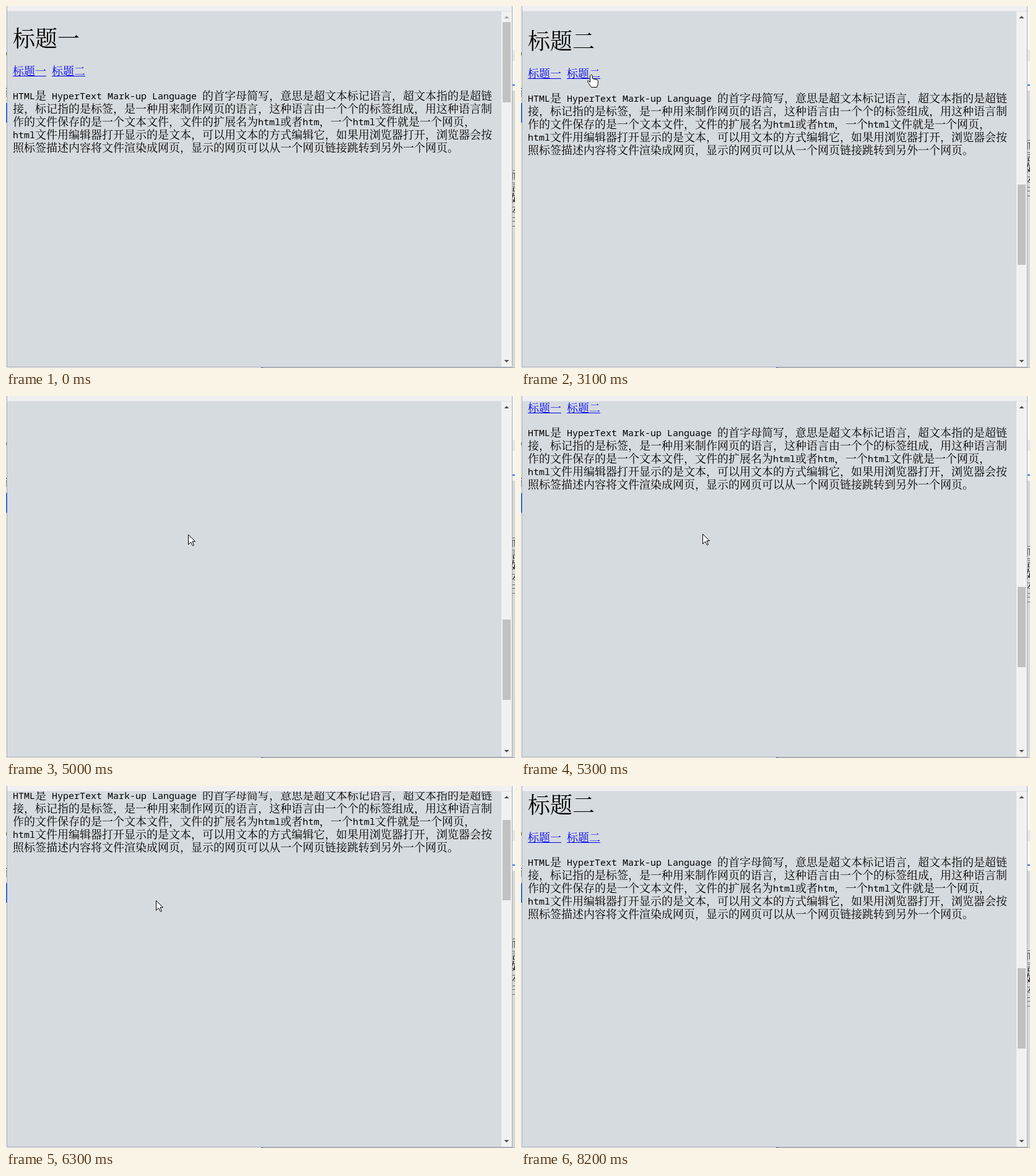
Animation of 822 by 586 pixels, one loop 8.8 s. Source, as an HTML page with a canvas:

```html
<!DOCTYPE html>
<html lang="zh-CN">
<head>
<meta charset="utf-8">
<style>
html, body { margin: 0; width: 100%; height: 100%; overflow: hidden; }
canvas { display: block; }
</style>
</head>
<body>
<canvas id="stage" width="822" height="586"></canvas>
<script>
const ctx = document.getElementById('stage').getContext('2d');
const LOOP = 8800, STEP = 100;
const SECTION = 1167, ANCHOR = SECTION + 22;   // second heading, and where its link lands
const JUMPS = [2700, 7500];                    // clicks on the second link
const PX_PER_THUMB = 4.42;
const CJK = '"Noto Serif CJK SC", "Noto Sans CJK SC", "Noto Sans CJK", serif';
const MONO = '"Noto Sans Mono", "Liberation Mono", monospace';
const TITLES = ['标题一', '标题二'];
const LINES = [
  'HTML是 HyperText Mark-up Language 的首字母简写，意思是超文本标记语言，超文本指的是超链',
  '接，标记指的是标签，是一种用来制作网页的语言，这种语言由一个个的标签组成，用这种语言制',
  '作的文件保存的是一个文本文件，文件的扩展名为html或者htm，一个html文件就是一个网页，',
  'html文件用编辑器打开显示的是文本，可以用文本的方式编辑它，如果用浏览器打开，浏览器会按',
  '照标签描述内容将文件渲染成网页，显示的网页可以从一个网页链接跳转到另外一个网页。'
];

// Turning points [time, value, ...]; motion eases from one to the next
const WHEEL = [[2900, ANCHOR], [4000, 857], [5000, 1485], [5700, 887], [6500, 0]];
const BEHIND = [[1500, 0], [2100, 172], [3700, -148], [5000, -37], [5700, 0],
  [6500, -22], [7500, -22], [8200, 0]];
const LINK = [104, 105];
const POINTER = [[300, 770, 56], [1100, 154, 185], [1500, 154, 185], [2100, 140, 131],
  [2600, ...LINK], [3000, ...LINK], [3700, 295, 228], [5700, 293, 223], [6900, 190, 146],
  [7200, ...LINK], [7500, ...LINK], [8200, 420, 600]];

const ARROW = new Path2D('M0 0V16L4 12L7 18L9 17L6.5 11H11Z');
const HAND = new Path2D('M-1 0H1L2 1V6L10 8L11 10V14L9 20H0L-6 11L-5 9L-2 12V1Z');

function at(track, t) {
  const next = track.findIndex(key => key[0] >= t);
  if (next < 1) return track.at(next).slice(1);
  const [t0, ...from] = track[next - 1], [t1, ...to] = track[next];
  const k = .5 - .5 * Math.cos(Math.PI * (t - t0) / (t1 - t0));
  return from.map((v, i) => Math.round(v + (to[i] - v) * k));
}

function scrollAt(t) {
  if (t < JUMPS[0]) return 0;
  return t >= JUMPS[1] ? ANCHOR : at(WHEEL, t)[0];
}

function rect(x, y, w, h, color) {
  ctx.fillStyle = color;
  ctx.fillRect(x, y, w, h);
}

function text(str, x, y, font = `18px ${CJK}`, color = '#000') {
  ctx.font = font;
  ctx.fillStyle = color;
  ctx.fillText(str, x, y);
}

// Full-width characters take 18px, Latin ones 9px
function mixedLine(line, x, y) {
  for (const part of line.match(/[\x00-\xff]+|[^\x00-\xff]+/g)) {
    const latin = part.charCodeAt(0) < 256;
    text(part, x, y - latin, latin ? `300 15px ${MONO}` : undefined);
    x += part.length * (latin ? 9 : 18);
  }
}

function section(title, y) {
  text(title, 11, y + 66, `500 36px ${CJK}`);
  TITLES.forEach((label, i) => {
    const x = 11 + i * 63;
    text(label, x, y + 112, undefined, '#00e');
    rect(x, y + 113, 54, 1, '#00e');
  });
  LINES.forEach((line, i) => mixedLine(line, 11, y + 152 + i * 21));
}

// Slivers of the windows behind, visible past both edges
function backdrop(shift) {
  rect(0, 0, 822, 586, '#f3f3f5');
  rect(818, 137, 4, 449, '#d5d9dc');
  [...'而言如本王'].forEach((c, i) => text(c, 815, 280 + shift + i * 19));
  rect(818, 0, 4, 137, '#f8f8fa');
  rect(818, 71, 4, 18, '#e6e7e9');
  rect(818, 127, 4, 2, '#3472e0');
  rect(0, 75, 2, 5, '#77752d');
  text('简', -15, 147);
  rect(412, 585, 410, 1, '#a9b1b8');
  rect(412, 584, 3, 2, '#3472c8');
}

function triangle(y, dir, color) {
  ctx.fillStyle = color;
  ctx.fill(new Path2D(`M804.5 ${y - 2 * dir}h8l-4 ${4 * dir}Z`));
}

function page(scroll) {
  rect(1, 0, 817, 585, '#a8abb0');
  rect(0, 157, 2, 32, '#2f6fdf');
  rect(2, 0, 815, 9, '#f0f0f2');
  rect(2, 8, 815, 1, '#dcdfe3');
  rect(2, 9, 798, 575, '#d6dbdf');
  ctx.save();
  ctx.beginPath();
  ctx.rect(2, 9, 798, 575);
  ctx.clip();
  TITLES.forEach((title, i) => section(title, i * SECTION - scroll));
  ctx.restore();
  rect(800, 9, 17, 575, '#f1f1f1');
  rect(802, Math.round(26 + scroll / PX_PER_THUMB), 13, 130, '#c1c1c1');
  triangle(18, -1, scroll ? '#505050' : '#a3a3a3');
  triangle(575, 1, '#505050');
}

function pointer(x, y, scroll) {
  const row = (y + scroll) % SECTION;
  const over = (top, bottom, right) => row > top && row < bottom && x > 11 && x < right;
  ctx.save();
  ctx.translate(x + .5, y + .5);
  if (over(135, 239, 785)) {
    ctx.stroke(new Path2D('M-3 -8H4M0 -8V8M-3 8H4'));
  } else {
    const icon = over(96, 114, 128) ? HAND : ARROW;
    ctx.fillStyle = '#fff';
    ctx.fill(icon);
    ctx.stroke(icon);
  }
  ctx.restore();
}

function draw(t) {
  const scroll = scrollAt(t);
  backdrop(at(BEHIND, t)[0]);
  page(scroll);
  if (t >= 300 && t < 8200) pointer(...at(POINTER, t), scroll);
}

let shown = -1;
function tick(now) {
  const t = Math.floor(now % LOOP / STEP) * STEP;
  if (t !== shown) draw(shown = t);
  requestAnimationFrame(tick);
}
requestAnimationFrame(tick);
</script>
</body>
</html>
```
